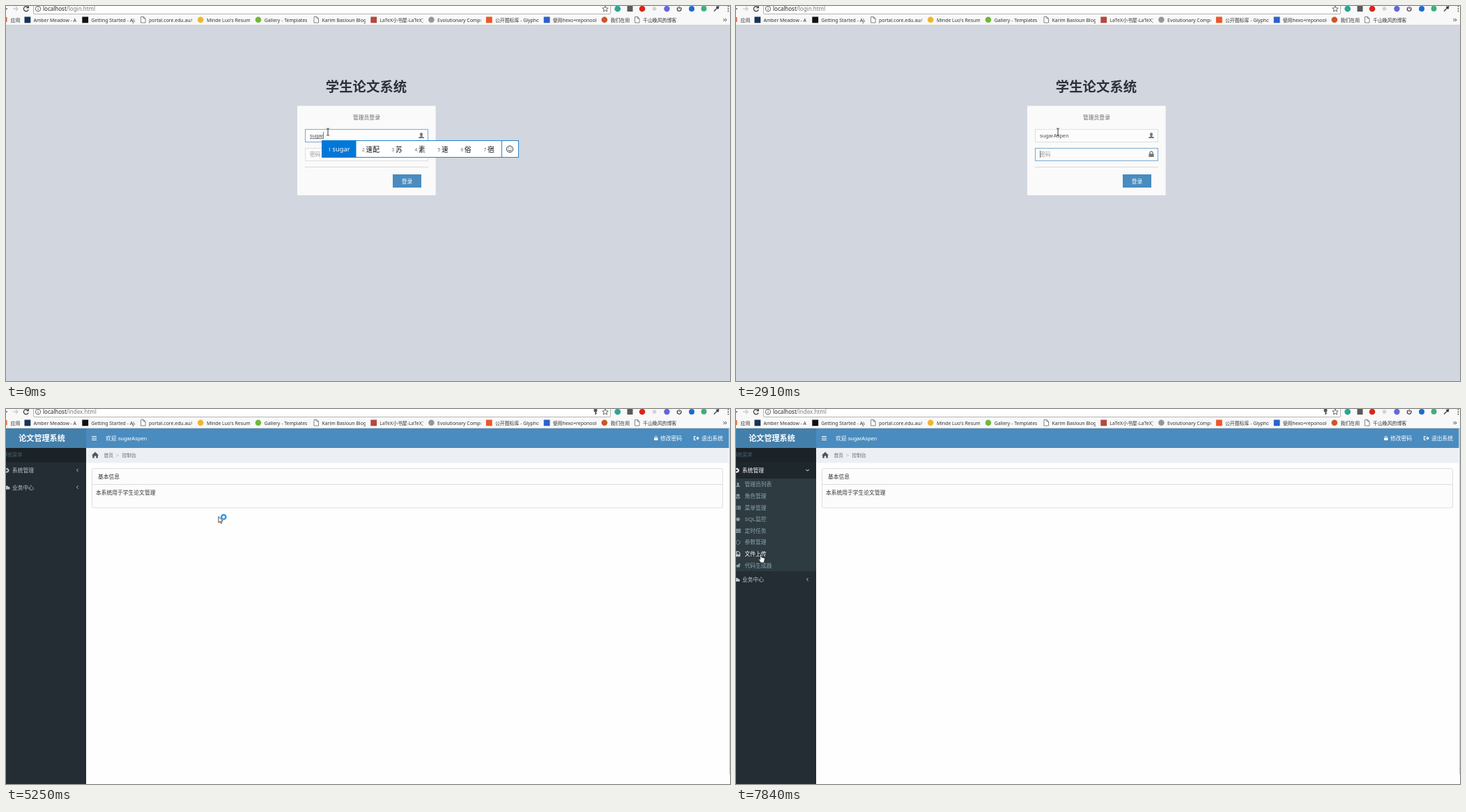
These frames come from a looping animation (1039x539 px, 8 s). An HTML page:

```html
<!DOCTYPE html>
<html lang="zh-CN">
<head>
<meta charset="utf-8">
<title>学生论文系统</title>
<style>
  html, body { margin: 0; width: 100%; height: 100%; overflow: hidden; }
  #stage { display: block; width: 100%; height: 100%; }
  text { font: 7.78px "Liberation Sans", "Noto Sans CJK SC", "Noto Sans CJK", sans-serif; white-space: pre; }
  .ui text, text.ui { font: 6.9px "Noto Sans", "Noto Sans CJK SC", "Noto Sans CJK", sans-serif; }
  .ui .url { font-size: 8px; }
  .ui .pick { font-size: 9.7px; }
  .ui .num { font-size: 6.5px; fill: #666; }
  .small { font-size: 6.8px; }
  .title { font-size: 19.4px; font-weight: bold; }
  .brand { font-size: 11.1px; font-weight: bold; }
  .line { fill: none; stroke: currentColor; }
  .item { color: #8aa4af; }
  .parent { color: #b8c7ce; }
  .hover { color: #fff; }
  .item text, .parent text { fill: currentColor; }
</style>
</head>
<body>
<svg id="stage" viewBox="0 0 1039 539">
  <defs>
    <g id="lock">
      <rect x="-3.6" y="-.7" width="7.2" height="4.7" rx=".6" fill="currentColor"/>
      <path class="line" d="M-2.1 0v-1.8a2.1 2.1 0 0 1 4.2 0V0" stroke-width="1.2"/>
    </g>
    <g id="person" fill="currentColor">
      <ellipse cy="-1.5" rx="2.1" ry="2.6"/>
      <path d="M-1 0h2v1.5l3 1.2V4h-8V2.7l3-1.2z"/>
    </g>
    <g id="doc"><path d="M1.5.5h4l2.5 2.5v6h-6.5zM5.5.5v2.5h2.5" fill="#fff" stroke="#666" stroke-width=".8"/></g>
    <clipPath id="menuClip"><rect id="menuWindow" y="100" width="115" height="0"/></clipPath>
  </defs>

  <g id="login">
    <rect y="28" width="1039" height="511" fill="#d2d6de"/>
    <text class="title" x="517" y="123" text-anchor="middle" fill="#2e3138">学生论文系统</text>
    <rect x="418" y="143.5" width="198.6" height="128.5" fill="#fafafa"/>
    <text x="517.5" y="163" text-anchor="middle" fill="#666">管理员登录</text>
    <rect id="userBox" x="429.4" y="177.3" width="176.1" height="18.2" fill="#fcfcfc" stroke-width=".8"/>
    <rect id="passBox" x="429.4" y="204.4" width="176.1" height="18.1" fill="#fcfcfc" stroke-width=".8"/>
    <text id="user" x="436" y="189" fill="#555"></text>
    <text id="pass" x="436" y="216"></text>
    <rect id="caret" width="1" height="10" fill="#777"/>
    <g color="#777">
      <use href="#person" x="596" y="186"/>
      <use href="#lock" x="596" y="213"/>
    </g>
    <path d="M429 231.5h177" stroke="#dadada"/>
    <rect x="555" y="242" width="41" height="19" fill="#4a8cbf"/>
    <text x="575.5" y="255" text-anchor="middle" fill="#fff">登录</text>
    <g id="ime" class="ui">
      <path d="M436 190.5h19.5" stroke="#555" stroke-width=".8"/>
      <rect x="453.5" y="193.5" width="282" height="24" fill="#fff" stroke="#2482cf"/>
      <rect x="453" y="193" width="49.5" height="25" fill="#0078d7"/>
      <text class="num" x="462.5" y="209" style="fill:#fff">1</text>
      <text x="468.5" y="209.3" fill="#fff" style="font-size:9.3px">sugar</text>
      <path d="M711.5 194v24" stroke="#2482cf"/>
      <g class="line" color="#222" stroke-width=".9">
        <circle cx="723" cy="205.7" r="4.6"/>
        <path d="M720.5 207q2.5 2.6 5 0M721.3 203.5v1.3M724.7 203.5v1.3"/>
      </g>
    </g>
  </g>

  <g id="dash">
    <rect y="28" width="1039" height="511" fill="#fefefe"/>
    <rect x="115" y="28" width="922.5" height="28" fill="#4a8cbf"/>
    <rect x="115" y="56" width="922.5" height="21.5" fill="#ecf0f5"/>
    <path d="M1038.5 28v497" stroke="#c9ccd0"/>
    <g fill="#fff" color="#fff">
      <path class="line" d="M123 39.5h7M123 42h7M123 44.5h7" stroke-width="1.2"/>
      <text id="welcome" x="143" y="45"></text>
      <use href="#lock" transform="translate(932.8 42) scale(.75)"/>
      <text x="939" y="45">修改密码</text>
      <path class="line" d="M990 39.5h-2.5v5h2.5M989.5 42h4M991.8 39.8l2.2 2.2l-2.2 2.2" stroke-width="1.2"/>
      <text x="998" y="45">退出系统</text>
    </g>
    <path d="M123 66.5l5-4.7l5 4.7h-1.2v4h-2.5v-3h-2.6v3h-2.5v-4z" fill="#555"/>
    <g fill="#666">
      <text class="small" x="140.5" y="69">首页</text>
      <text class="small" x="158" y="69" fill="#aaa">&gt;</text>
      <text class="small" x="166.5" y="69">控制台</text>
    </g>
    <g id="panel" fill="#333">
      <rect x="123.5" y="85.5" width="905" height="56.5" rx="2" fill="#fcfcfc" stroke="#ddd"/>
      <path d="M124 108.5h904" stroke="#ddd"/>
      <text x="132" y="100">基本信息</text>
      <text x="129" y="122.5">本系统用于学生论文管理</text>
    </g>
    <rect y="28" width="115" height="511" fill="#242d33"/>
    <rect y="28" width="115" height="28" fill="#437fab"/>
    <text class="brand" x="51.5" y="46" text-anchor="middle" fill="#fff">论文管理系统</text>
    <rect y="56" width="115" height="20.5" fill="#1b2328"/>
    <text class="small" x="-4" y="67.5" fill="#4b646f">导航菜单</text>
    <rect id="parentBack" y="76.5" width="115" height="24" fill="#1e272c"/>
    <g id="parent" class="parent">
      <circle class="line" cx="1" cy="88.3" r="2.2" stroke-width="1.6"/>
      <circle class="line" cx="1" cy="88.3" r="3.3" stroke-width="1" stroke-dasharray="1.3"/>
      <text x="9" y="91">系统管理</text>
      <path id="chevron" class="line" d="M103.6 85.8l-2.2 2.2l2.2 2.2"/>
    </g>
    <g clip-path="url(#menuClip)">
      <rect y="100" width="115" height="133" fill="#2e3b41"/>
      <g id="menu"></g>
    </g>
    <g id="business" class="parent">
      <path d="M0 110.5a2.6 2.6 0 0 1 3.5 1.3a2 2 0 0 1 1.2 3.7H0z" fill="currentColor"/>
      <text x="9" y="115.5">业务中心</text>
      <path class="line" d="M103.6 110.3l-2.2 2.2l2.2 2.2"/>
    </g>
  </g>

  <g id="browser" class="ui">
    <rect width="1039" height="28" fill="#f8f8f8"/>
    <rect x="39.5" y="-4" width="828" height="15.5" rx="1.5" fill="#fff" stroke="#b5b5b5"/>
    <path d="M0 27.5h1039" stroke="#d0d0d0"/>
    <g class="line" stroke-width="1.3">
      <path d="M0 4h2" color="#666"/>
      <path d="M10 4h7M14 1l3 3l-3 3" color="#ccc"/>
      <g color="#444">
        <path id="reload" d="M31.6 1.9a3.5 3.5 0 1 0 .6 3.3M32.3 0v2.7h-2.8"/>
        <path id="stop" d="M25.5 .8l6.4 6.4M31.9 .8l-6.4 6.4"/>
      </g>
      <g color="#555" stroke-width=".9">
        <circle cx="46" cy="4" r="3.7"/>
        <path d="M46 3.5v2.6M46 1.6v1"/>
      </g>
      <path d="M860 0l1.2 2.7l3 .3l-2.3 2l.7 2.9l-2.6-1.5l-2.6 1.5l.7-2.9l-2.3-2l3-.3z" color="#555" stroke-width=".9"/>
    </g>
    <text class="url" x="53" y="6.8" fill="#222">localhost<tspan id="path" fill="#777"></tspan></text>
    <g id="key" fill="#555"><circle cx="846" cy="2" r="2.5"/><path d="M845.3 3h1.5v5h-1.5zM846.5 5.5h1.7v1.2h-1.7z"/></g>
    <circle cx="877.7" cy="4" r="4.4" fill="#2aa596"/>
    <rect x="891.5" y="0" width="8" height="8" fill="#5a5a5a"/>
    <circle cx="913" cy="4" r="4.3" fill="#d8261c"/>
    <circle cx="930.5" cy="4" r="2.8" fill="#d2d2d2"/>
    <circle cx="948.4" cy="4" r="4.2" fill="#6267dd"/>
    <path class="line" d="M964.4 2a2.9 2.9 0 1 0 3.4 0M966.1 .7v3.2" color="#222" stroke-width="1.1"/>
    <circle cx="984" cy="4" r="4" fill="#1c6bd0"/>
    <circle id="badge" cx="1001.5" cy="3.7" r="4"/>
    <path d="M1016 7.5l4.5-4.5" stroke="#555" stroke-width="1.6"/>
    <path d="M1019.5 1l3 3M1021 2.5l2-2" stroke="#334" stroke-width="2"/>
    <path d="M1036.5 0v9" stroke="#555" stroke-width="1.6" stroke-dasharray="1.6 1.7"/>
    <rect y="16" width="1.5" height="7" fill="#e0673b"/>
    <text x="6.5" y="22.5" fill="#333">应用</text>
    <path class="line" d="M1029.5 18l2 2l-2 2M1032 18l2 2l-2 2" color="#333" stroke-width=".9"/>
  </g>

  <g id="beam" class="line" color="#222" stroke-width=".9"><path d="M-2 -5h1.5l.5 .5l.5-.5h1.5M0 -4.5v9M-2 5h1.5l.5-.5l.5 .5h1.5"/></g>
  <g id="busy">
    <path d="M0 0v9l2.1-1.9l1.4 3l1.4-.7l-1.4-2.8h2.8z" fill="#fff" stroke="#222" stroke-width=".8"/>
    <circle cx="7.3" cy=".8" r="3.2" fill="#e8f5fd" stroke="#2793e0" stroke-width="2.2"/>
  </g>
  <path id="hand" d="M2 1q1-1.2 1.8 0v4l4 1q1.2.4 1 1.6l-.7 3.4l-.9 2H3l-2.6-4q-.7-1.2.3-1.4L2 8.5z" fill="#fff" stroke="#222" stroke-width=".8"/>
</svg>

<script>
const $ = id => document.getElementById(id);
const add = (id, markup) => $(id).insertAdjacentHTML('beforeend', markup);

// Bookmarks: label and favicon colour; '' = page icon, leading 'o' = round
const bookmarks = [
  ['Amber Meadow - A bit', '#173457'], ['Getting Started - Aja', '#111'], ['portal.core.edu.au/c', ''],
  ['Minde Luo\'s Resume', 'o#efb52d'], ['Gallery - Templates', 'o#70b83a'], ['Karim Basloun Blog', ''],
  ['LaTeX小书屋-LaTeX工', '#b5483f'], ['Evolutionary Comput', 'o#93979c'], ['公开图标库 - Glyphom', '#ee5527'],
  ['使用hexo+reponook搭', '#2b62c9'], ['我们在用', 'o#cf5429'], ['千山晚风的博客', '']
];
bookmarks.forEach(([label, color], i) => {
  const x = i < 11 ? 26.5 + i * 82.8 : 901;
  const icon = !color ? `<use href="#doc" x="${x}" y="15"/>`
    : color[0] === 'o' ? `<circle cx="${x + 4.3}" cy="19.8" r="4.3" fill="${color.slice(1)}"/>`
    : `<rect x="${x}" y="15.5" width="8.8" height="8.8" fill="${color}"/>`;
  add('browser', `${icon}<svg x="${x + 13}" y="13" width="62.5" height="14"><text y="9.6" fill="#333">${label}</text></svg>`);
});

['速配', '苏', '素', '速', '俗', '宿'].forEach((word, i) => {
  const x = i ? 520.5 + i * 33 : 511;
  add('ime', `<text class="num" x="${x}" y="209">${i + 2}</text><text class="pick" x="${x + 5.5}" y="209.6" fill="#111">${word}</text>`);
});

// Menu entries with an icon drawn around its own centre
const stroke = (d, w = 1) => `<path class="line" d="${d}" stroke-width="${w}"/>`;
const menu = [
  ['管理员列表', '<use href="#person" transform="scale(.75)"/>'],
  ['角色管理', '<circle cy="-1.5" r="1.8" fill="currentColor"/>' + stroke('M-3 -1.5h6M-2.5 3V1h5v2z')],
  ['菜单管理', stroke('M-3.5 -2h1.5M-1 -2h5M-3.5 0h1.5M-1 0h5M-3.5 2h1.5M-1 2h5', 1.3)],
  ['SQL监控', '<ellipse rx="1.9" ry="2.7" fill="currentColor"/>' + stroke('M-3 -2l6 4M3 -2l-6 4M-3.5 0h7', .8)],
  ['定时任务', stroke('M-3 -2.2h7M-3 0h7M-3 2.2h7', 1.5)],
  ['参数管理', '<circle class="line" r="2.9" stroke-dasharray="2.4 .6"/>'],
  ['文件上传', stroke('M-2.5 -3.3h3.5l1.7 1.7v5h-5.2zM-1.5 2l1.3-2l1.8 2z', .9)],
  ['代码生成器', '<path d="M3.5 -3.5l-7 4l2 .8l.5 2.2l1.3-1.5l1.9 .9z" fill="currentColor"/>']
];
menu.forEach(([label, icon], i) => {
  const y = 108.7 + i * 16.6;
  add('menu', `<g class="item"><g transform="translate(2.8 ${y})">${icon}</g><text x="12.5" y="${y + 2.7}">${label}</text></g>`);
});
const items = [...$('menu').children];

const name = 'sugarAspen';
$('welcome').textContent = '欢迎 ' + name;

// Each entry changes part of the running state
const steps = [
  [0, { page: 'login', typed: 5, dots: 0, focus: 'user', caret: true, ime: true, loading: false, index: false,
        panel: false, key: false, open: 0, active: false, hover: -1, cursor: 'beam', at: [462, 181] }],
  [500, { ime: false }],
  [1060, { caret: false }],
  [1330, { typed: 6, caret: true }],
  [1890, { typed: 7 }],
  [2140, { typed: 8 }],
  [2410, { typed: 9 }],
  [2660, { typed: 10 }],
  [2910, { focus: 'pass' }],
  [3190, { dots: 1 }],
  [3460, { dots: 3 }],
  [3710, { dots: 5 }],
  [4230, { loading: true, index: true, cursor: 'busy', at: [461, 180] }],
  [4480, { page: 'dash' }],
  [4750, { panel: true }],
  [5000, { loading: false, key: true }],
  [5250, { at: [305, 154.5] }],
  [5500, { at: [105, 132] }],
  [5750, { cursor: 'hand', at: [38, 89], active: true }],
  [6280, { open: .91 }],
  [6550, { open: 1 }],
  [6800, { at: [41, 160], hover: 3 }],
  [7070, { at: [41, 174], hover: 4 }],
  [7320, { at: [39, 187.5], hover: 5 }],
  [7590, { at: [37, 201], hover: 6 }],
  [7840, { at: [32.5, 208] }]
];

const show = (id, on) => { $(id).style.display = on ? '' : 'none'; };

function render(s) {
  for (const page of ['login', 'dash']) show(page, s.page === page);
  for (const kind of ['beam', 'busy', 'hand']) show(kind, s.cursor === kind);
  $(s.cursor).setAttribute('transform', `translate(${s.at})`);

  $('user').textContent = name.slice(0, s.typed);
  $('pass').textContent = s.dots ? '•'.repeat(s.dots) : '密码';
  $('pass').setAttribute('fill', s.dots ? '#444' : '#999');
  for (const field of ['user', 'pass'])
    $(field + 'Box').setAttribute('stroke', s.focus === field ? '#5c96c4' : '#d6d9df');
  if (s.page === 'login') {
    const onPass = s.focus === 'pass';
    const width = onPass && !s.dots ? 0 : $(s.focus).getComputedTextLength();
    $('caret').setAttribute('x', Math.floor(436 + width));
    $('caret').setAttribute('y', onPass ? 208 : 181);
  }
  show('caret', s.caret);
  show('ime', s.ime);

  $('path').textContent = s.index ? '/index.html' : '/login.html';
  show('reload', !s.loading);
  show('stop', s.loading);
  show('key', s.key);
  $('badge').setAttribute('fill', s.loading ? '#a9a9a9' : '#3fae7c');

  show('panel', s.panel);
  show('parentBack', s.active);
  $('parent').classList.toggle('hover', s.active);
  $('chevron').setAttribute('transform', `rotate(${-90 * s.open} 102.5 88)`);
  $('menuWindow').setAttribute('height', 133 * s.open);
  $('business').setAttribute('transform', `translate(0 ${132.5 * s.open})`);
  items.forEach((item, i) => item.classList.toggle('hover', i === s.hover));
}

const start = performance.now();
let shown = -1;
function tick() {
  const time = (performance.now() - start) % 8000;
  const past = steps.filter(([from]) => from <= time);
  if (past.length !== shown) {
    shown = past.length;
    render(Object.assign({}, ...past.map(([, change]) => change)));
  }
  requestAnimationFrame(tick);
}
tick();
</script>
</body>
</html>
```
